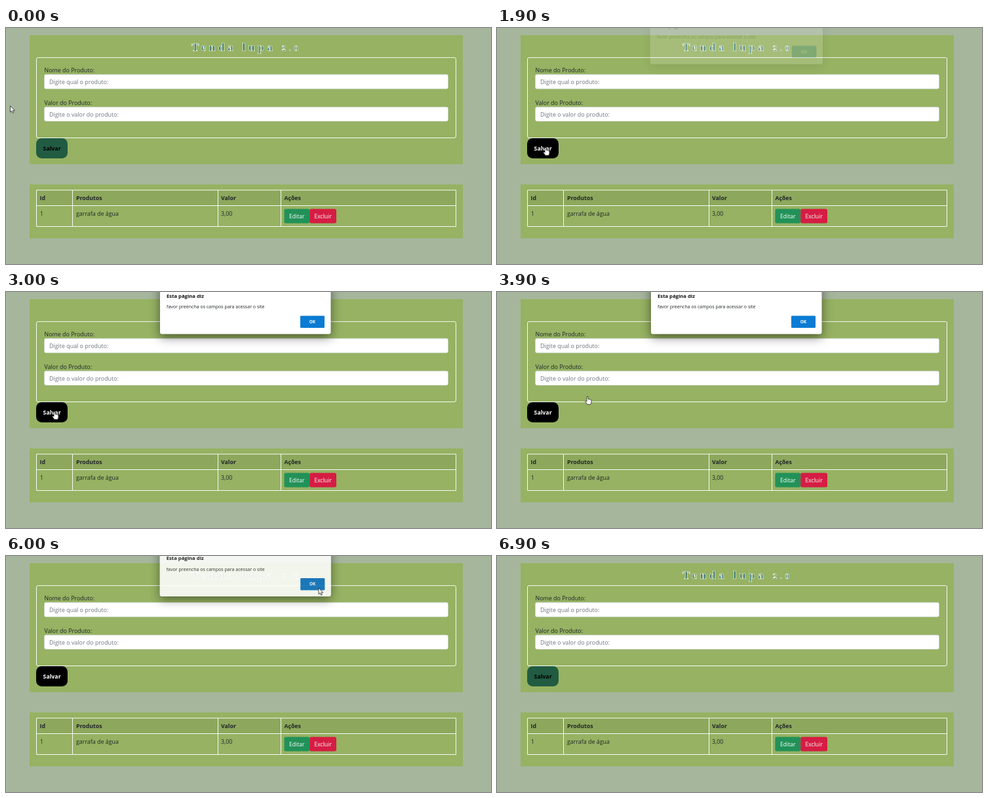
An HTML page that plays this animation: 740x362 px, repeating every 8200 ms.

```html
<!DOCTYPE html>
<html lang="pt-BR">
<head>
<meta charset="utf-8">
<title>Cadastro de produtos</title>
<style>
  html, body { margin: 0; width: 100%; height: 100%; overflow: hidden; background: #a6b69c; }
  svg { display: block; width: 740px; height: 362px; }
  text { font: 8.9px "Open Sans", "Noto Sans", sans-serif; fill: #212529; }
  .bold { font-weight: 700; font-size: 8.75px; }
  .hint { fill: #6c757d; }
  .panel { fill: #96b262; }
  .line { fill: none; stroke: #fff; stroke-opacity: .92; }
  .input { fill: #fff; stroke: #ced4da; stroke-width: .6; }
  .action { font-size: 8.65px; fill: #fff; }
  .title {
    font: 700 17px "Liberation Serif", "Noto Serif", serif;
    letter-spacing: 4.75px; fill: #23685a; stroke: #fff; stroke-width: .65px;
  }
  .title tspan { font-size: 12.5px; }
  .sheet { fill: #fff; filter: drop-shadow(0 5px 8px rgba(0, 0, 0, .5)); }
  .heading { font-size: 7.7px; font-weight: 700; fill: #111; }
  .message { font-size: 7.06px; }
  .ok { font-size: 6.4px; font-weight: 700; fill: #fff; }
  .pointer { fill: #fff; stroke: #222; stroke-width: .8; stroke-linejoin: round; }
</style>
</head>
<body>
<svg viewBox="0 0 740 362">
  <rect class="panel" x="36" y="11" width="661" height="198"/>
  <text class="title" x="283" y="35">Tenda lupa <tspan>2.0</tspan></text>
  <rect class="line" x="46.5" y="45.4" width="640" height="123.1" rx="2.5"/>

  <text x="58.5" y="67.7">Nome do Produto:</text>
  <rect class="input" x="58.5" y="71.3" width="616" height="22" rx="2.4"/>
  <text class="hint" x="66" y="85.8">Digite qual o produto:</text>
  <text x="58.5" y="117.5">Valor do Produto:</text>
  <rect class="input" x="58.5" y="121.2" width="616" height="21.8" rx="2.4"/>
  <text class="hint" x="66" y="135.6">Digite o valor do produto:</text>

  <rect id="save" x="46" y="169" width="48" height="31" rx="8.5"/>
  <text id="saveText" class="bold" x="56.6" y="188">Salvar</text>

  <rect class="panel" x="36" y="240" width="661" height="82.6"/>
  <rect x="46.5" y="249" width="640" height="23.5" fill="#000" opacity=".06"/>
  <path class="line" d="M46.5 248.7H686.5V304.5H46.5ZM46.5 272.5H686.5M101.5 249V304.5M323.5 249V304.5M419.5 249V304.5"/>
  <g class="row">
    <text class="bold" x="51.6" y="264.3">Id</text>
    <text class="bold" x="107" y="264.3">Produtos</text>
    <text class="bold" x="328" y="264.3">Valor</text>
    <text class="bold" x="424.4" y="264.3">Ações</text>
    <text x="51.8" y="288">1</text>
    <text x="107" y="288">garrafa de água</text>
    <text x="328" y="288">3,00</text>
  </g>
  <rect x="424.4" y="277.6" width="38.8" height="22" rx="2.4" fill="#219258"/>
  <text class="action" x="431.9" y="292">Editar</text>
  <rect x="463.2" y="277.6" width="40.8" height="22" rx="2.4" fill="#d51d44"/>
  <text class="action" x="470.4" y="292">Excluir</text>

  <g id="dialog">
    <rect class="sheet" x="235" y="-20" width="260.5" height="84.6" rx="3"/>
    <text class="heading" x="245" y="9">Esta página diz</text>
    <text class="message" x="245" y="25.2">favor preencha os campos para acessar o site</text>
    <rect id="ok" x="449" y="36.5" width="37" height="18.5" rx="1.2"/>
    <text class="ok" x="467.3" y="48" text-anchor="middle">OK</text>
  </g>

  <g id="cursor" class="pointer">
    <path id="arrow" d="M0 0V9.6L2.2 7.6L3.7 11.2L5.3 10.5L3.8 7.1H6.8Z"/>
    <path id="hand" d="M-1 .9Q0-.7 1 .9V4.4Q2.2 3.6 2.9 4.8Q4.1 4.2 4.6 5.3Q5.9 5 6 6.4V9Q5.9 10.6 5 12.4H-.4Q-1.4 10.4-3 8.6Q-3.6 7.2-2.2 7L-1 8Z"/>
  </g>
</svg>
<script>
  const LOOP = 8200, STEP = 100;
  const $ = id => document.getElementById(id);

  // Rows: time, then values
  const path = [
    [400, 6.5, 119.5], [500, 9, 122], [600, 18, 130], [900, 60, 168], [1000, 69, 178], [1200, 74, 183],
    [3600, 74, 183], [3700, 80, 181], [3800, 103, 172], [3900, 138, 160], [4000, 200, 131],
    [4300, 426, 33], [4400, 465, 19], [4500, 478, 15], [4600, 487, 24], [4700, 488, 39],
    [4800, 482, 51], [5000, 477, 49], [6600, 477, 49], [6700, 455, 26], [6800, 402, 1]
  ];
  const hover = [[900, 0], [1000, .35], [1100, .8], [1200, 1], [6000, 1], [6100, .4], [6200, .12], [6300, 0]];
  // Opacity, vertical offset, widening
  const sheet = [
    [1800, 0, -11, 1.012], [1900, .15, -9.2, 1.011], [2000, .55, -5, 1.006], [2100, .83, -2, 1.003],
    [2200, .96, -.6, 1.001], [2300, 1, 0, 1], [5900, 1, 0, 1], [6000, .88, -2.5, 1.003],
    [6100, .5, -6.8, 1.01], [6200, .2, -9, 1.011], [6300, .06, -10, 1.012], [6400, 0, -11, 1.012]
  ];

  function sample(rows, t) {
    const i = rows.findIndex(row => row[0] > t);
    if (i === 0) return rows[0].slice(1);
    if (i < 0) return rows.at(-1).slice(1);
    const a = rows[i - 1], b = rows[i], k = (t - a[0]) / (b[0] - a[0]);
    return a.slice(1).map((v, n) => v + (b[n + 1] - v) * k);
  }

  const show = (el, on) => el.style.display = on ? "" : "none";

  function draw(t) {
    const [x, y] = sample(path, t);
    $("cursor").setAttribute("transform", `translate(${x} ${y})`);
    show($("cursor"), t < 6900);
    const isHand = t >= 1000 && t < 4200;
    show($("hand"), isHand);
    show($("arrow"), !isHand);

    const [h] = sample(hover, t);
    const green = [33, 92, 66].map(c => c * (1 - h));
    $("save").style.fill = `rgb(${green})`;
    $("saveText").style.fill = `rgb(${[h, h, h].map(c => c * 255)})`;

    const [alpha, dy, wide] = sample(sheet, t);
    $("dialog").setAttribute("opacity", alpha);
    $("dialog").setAttribute("transform", `translate(${365.25 * (1 - wide)} ${dy}) scale(${wide} 1)`);
    const pressed = t >= 5800 && t < 5900;
    $("ok").style.fill = pressed ? "#0a64ae" : t >= 4800 ? "#0b70c3" : "#0b7bd4";
  }

  const start = performance.now();
  function tick() {
    const t = (performance.now() - start) % LOOP;
    draw(Math.floor(t / STEP) * STEP);
    requestAnimationFrame(tick);
  }
  tick();
</script>
</body>
</html>
```
